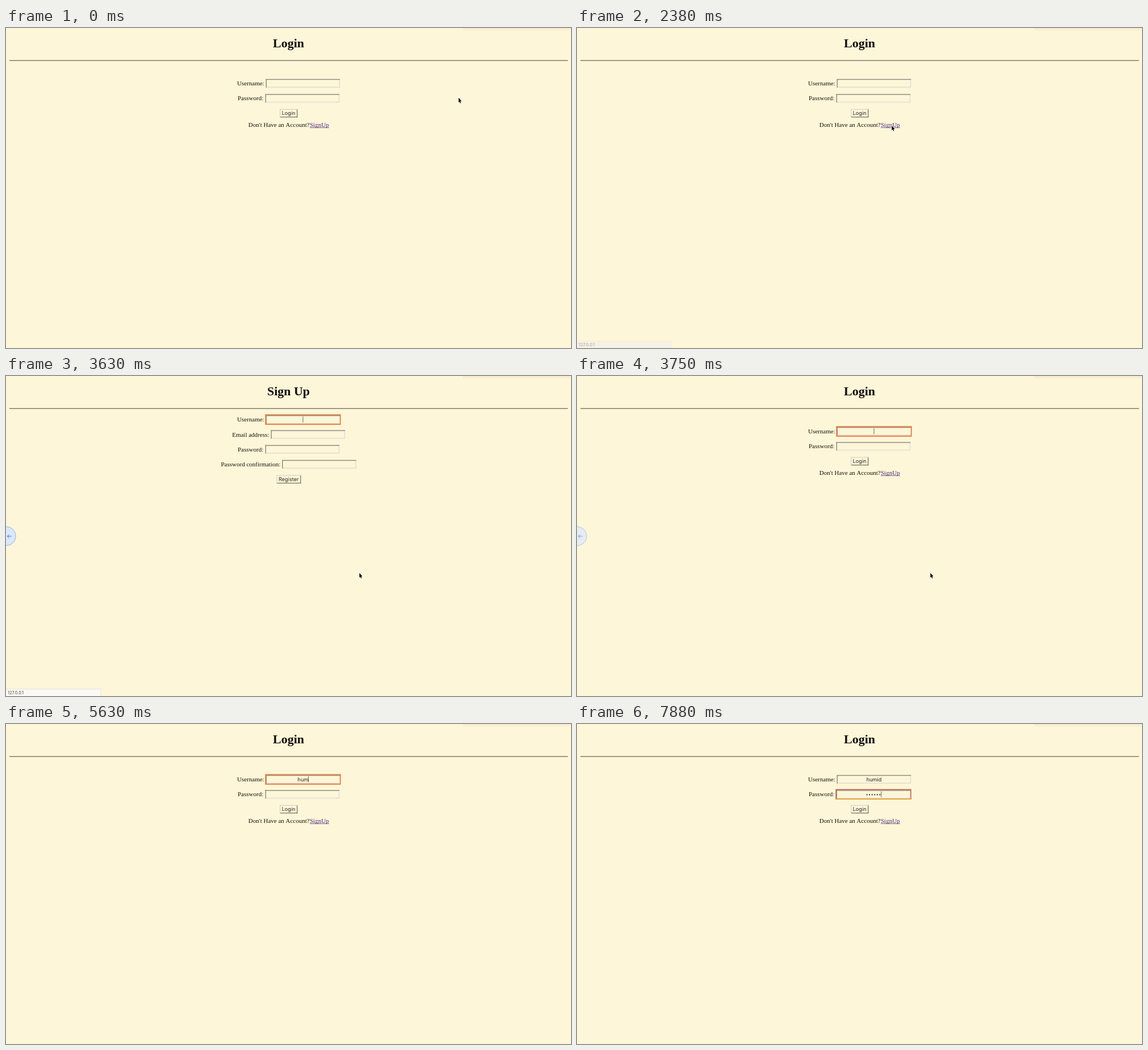
These frames come from a looping animation (995 px wide and 563 px high, 8 s). An HTML page with a canvas:

```html
<!DOCTYPE html>
<html lang="en">
<head>
<meta charset="utf-8">
<title>Login</title>
<style>
html, body { margin: 0; width: 100%; height: 100%; overflow: hidden; background: #fef6d8; }
canvas { display: block; width: 995px; height: 563px; }
</style>
</head>
<body>
<canvas id="stage" width="995" height="563"></canvas>
<script>
const ctx = document.getElementById('stage').getContext('2d');
const LOOP = 8000, STEP = 125;
const SERIF = '"Liberation Serif", serif';
const SANS = 'Inter, "Liberation Sans", sans-serif';
const FIELD_W = 130.6, FIELD_H = 15;
const USER = 'humid';
const USER_KEYS = [5250, 5375, 5625, 5875, 6000];
const PASS_KEYS = [7125, 7375, 7500, 7625, 7750, 7875];

const during = (t, from, to) => t >= from && t < to;
const ramp = (t, from, to) => Math.min(1, Math.max(0, (t - from) / (to - from)));
const smooth = p => p * p * (3 - 2 * p);
const typed = (t, keys) => keys.filter(k => t >= k).length;

function text(str, x, y, font, color = '#161410', align = 'left') {
  ctx.font = font;
  ctx.fillStyle = color;
  ctx.textAlign = align;
  ctx.fillText(str, x, y);
}

function rect(x, y, w, h, color) {
  ctx.fillStyle = color;
  ctx.fillRect(x, y, w, h);
}

function bevel(x, y, w, h, topLeft, bottomRight, b) {
  rect(x, y + h - b, w, b, bottomRight);
  rect(x + w - b, y, b, h, bottomRight);
  rect(x, y, w, b, topLeft);
  rect(x, y, b, h, topLeft);
}

function field(label, labelX, x, mid) {
  text(label, labelX, mid + 3.7, '11px ' + SERIF);
  bevel(x, mid - FIELD_H / 2, FIELD_W, FIELD_H, '#8b867c', '#dedcd6', 1.4);
}

function ring(x, mid, color, bottom = color) {
  const left = x - 0.5, top = mid - 8.4, w = FIELD_W + 1.2, h = 16.8;
  ctx.lineWidth = 1.6;
  ctx.strokeStyle = color;
  ctx.strokeRect(left, top, w, h);
  rect(left, top + h - 0.8, w, 1.6, bottom);
}

function caret(x, mid) {
  rect(x, mid - 5.2, 0.8, 10.4, '#4a443a');
}

function button(label, x, y, w) {
  bevel(x, y, w, 14.8, '#d9d6ce', '#77736a', 1.3);
  text(label, x + w / 2, y + 10.6, '9.17px ' + SANS, '#2a2824', 'center');
}

function header(title) {
  rect(0, 0, 995, 563, '#fef6d8');
  const haze = ctx.createLinearGradient(0, 0, 0, 6);
  haze.addColorStop(0, 'rgba(150,110,70,.09)');
  haze.addColorStop(1, 'rgba(150,110,70,0)');
  rect(805, 0, 190, 6, haze);
  text(title, 497.5, 33.8, 'bold 22px ' + SERIF, '#100e0b', 'center');
  rect(6, 56.6, 983.5, 1.3, '#6f6a5e');
}

function loginPage(t) {
  header('Login');
  field('Username:', 407, 457.6, 97.3);
  field('Password:', 408, 456.6, 123.7);
  button('Login', 482, 142.5, 31.3);
  text("Don't Have an Account?", 426.7, 173.7, '11px ' + SERIF);
  text('SignUp', 535, 173.7, '11px ' + SERIF, '#4f2a80');
  rect(535, 174.8, 34, 0.8, '#4f2a80');

  const name = USER.slice(0, typed(t, USER_KEYS));
  text(name, 523, 100.8, '9.17px ' + SANS, '#24211c', 'center');
  if (during(t, 3750, 6500)) {
    ring(457.6, 97.3, '#ec7a3e');
    const blinkOn = during(t, 3750, 4250) || t >= 4750;
    if (blinkOn) caret(522.6 + (name ? ctx.measureText(name).width / 2 : 0), 97.3);
  }
  if (t >= 6500) {
    ring(456.6, 123.7, '#c56a58', '#f0ae3a');
    const count = typed(t, PASS_KEYS), pitch = 4.55;
    const left = 522 - count * pitch / 2;
    ctx.fillStyle = '#24211c';
    for (let i = 0; i < count; i++) {
      ctx.beginPath();
      ctx.arc(left + (i + 0.5) * pitch, 124.4, 1.05, 0, Math.PI * 2);
      ctx.fill();
    }
    if (!during(t, 7000, 7125)) caret(left + count * pitch - 0.2, 123.7);
  }
}

function signUpPage(t) {
  header('Sign Up');
  field('Username:', 407, 457.6, 76.5);
  field('Email address:', 398.2, 466.5, 102.8);
  field('Password:', 408, 456.6, 129);
  field('Password confirmation:', 378.5, 486.2, 155.3);
  button('Register', 476, 174.3, 43.5);
  ring(457.6, 76.5, '#e9813a');
  if (!during(t, 3125, 3625)) caret(522.6, 76.5);
  if (during(t, 2875, 3375)) savedLogins();
}

function savedLogins() {
  ctx.save();
  ctx.shadowColor = 'rgba(0,0,0,.32)';
  ctx.shadowBlur = 8;
  ctx.shadowOffsetY = 2;
  rect(457.6, 83.8, 141.4, 24, '#ebeae8');
  ctx.restore();
  text('View Saved Logins', 527.5, 98.9, '8.05px ' + SANS, '#4a4947', 'center');
}

function statusBar(alpha) {
  if (!alpha) return;
  ctx.globalAlpha = alpha;
  rect(0, 550.5, 167.5, 13, '#dfdcd4');
  rect(0, 551.3, 166.8, 12, '#faf9f6');
  text('127.0.0.1', 3, 560, '7.4px ' + SANS, '#45433f');
  ctx.globalAlpha = 1;
}

function backBadge(shown, alpha) {
  if (!shown || !alpha) return;
  ctx.save();
  ctx.globalAlpha = alpha;
  ctx.translate(-18 * (1 - shown), 281.7);
  ctx.beginPath();
  ctx.arc(0.5, 0, 16.6, 0, Math.PI * 2);
  ctx.fillStyle = '#dce7fb';
  ctx.fill();
  ctx.lineWidth = 0.9;
  ctx.strokeStyle = '#86a9e6';
  ctx.stroke();
  ctx.beginPath();
  ctx.moveTo(9.7, 0.3);
  ctx.lineTo(2.5, 0.3);
  ctx.moveTo(5.6, -2.9);
  ctx.lineTo(2.4, 0.3);
  ctx.lineTo(5.6, 3.5);
  ctx.lineWidth = 1;
  ctx.strokeStyle = '#3c74d8';
  ctx.stroke();
  ctx.restore();
}

const PATH = [
  [1250, 797, 122.7], [2000, 556, 177], [2125, 554.3, 171.7], [2500, 554.3, 171.7],
  [3000, 622.3, 346.5], [3875, 622.3, 346.5], [4250, 556.2, 223.8], [4625, 504, 100.3]
];

function pointerAt(t) {
  const next = PATH.findIndex(p => p[0] > t);
  if (next === 0) return PATH[0].slice(1);
  if (next < 0) return PATH[PATH.length - 1].slice(1);
  const [t0, x0, y0] = PATH[next - 1], [t1, x1, y1] = PATH[next];
  const p = smooth(ramp(t, t0, t1));
  return [x0 + (x1 - x0) * p, y0 + (y1 - y0) * p];
}

function pointer(t) {
  if (t >= 5250) return;
  const [x, y] = pointerAt(t);
  ctx.save();
  ctx.translate(x, y);
  if (t > 4250 && y < 105) {
    ctx.beginPath();
    ctx.moveTo(-2.5, -7);
    ctx.quadraticCurveTo(0, -7, 0, -5);
    ctx.lineTo(0, 5);
    ctx.quadraticCurveTo(0, 7, -2.5, 7);
    ctx.moveTo(2.5, -7);
    ctx.quadraticCurveTo(0, -7, 0, -5);
    ctx.moveTo(0, 5);
    ctx.quadraticCurveTo(0, 7, 2.5, 7);
    ctx.lineWidth = 1;
    ctx.strokeStyle = '#222';
    ctx.stroke();
  } else {
    const shape = [[0, 0], [0, 8.3], [1.7, 6.7], [2.9, 9.7], [4.2, 9.1], [3, 6.2], [5.4, 6]];
    ctx.beginPath();
    shape.forEach(([px, py]) => ctx.lineTo(px, py));
    ctx.closePath();
    ctx.lineWidth = 1.3;
    ctx.lineJoin = 'round';
    ctx.strokeStyle = 'rgba(255,255,255,.9)';
    ctx.stroke();
    ctx.fillStyle = '#0b0b0b';
    ctx.fill();
  }
  ctx.restore();
}

function draw(now) {
  const t = Math.floor((now % LOOP) / STEP) * STEP;
  if (during(t, 2625, 3750)) signUpPage(t);
  else loginPage(t);
  if (during(t, 2375, 2625)) statusBar(t < 2500 ? 0.45 : 1);
  if (during(t, 3500, 3750)) statusBar(1);
  backBadge(smooth(ramp(t, 3250, 3625)), 1 - ramp(t, 3625, 4000));
  pointer(t);
}

const start = performance.now();
function tick() {
  draw(performance.now() - start);
  requestAnimationFrame(tick);
}
tick();
</script>
</body>
</html>
```
